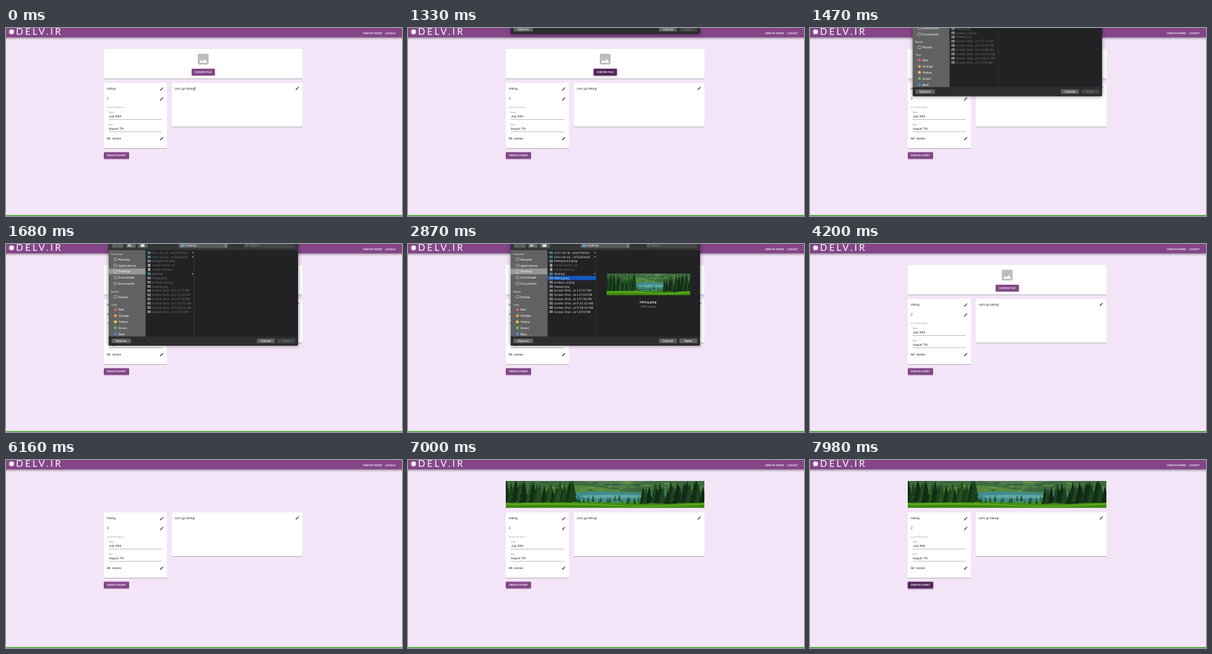
Animation of 640 by 305 pixels, one loop 8000 ms. Source, as an HTML page:

```html
<!DOCTYPE html>
<html lang="en">
<head>
<meta charset="utf-8">
<title>Event form</title>
<style>
  html, body { margin: 0; width: 100%; height: 100%; overflow: hidden; background: #f3e5f7; }
  svg { display: block; width: 100vw; height: 100vh; }
  text { font-family: Roboto, sans-serif; text-rendering: geometricPrecision; white-space: pre; }
  #dialog text { font-family: Inter, sans-serif; }
</style>
</head>
<body>
<svg id="stage" viewBox="0 0 640 305" preserveAspectRatio="none"></svg>
<script>
const LOOP = 8000, STEP = 70;
const PURPLE = [132, 70, 137], DARK = [84, 39, 92];
const EDIT = 'M3 17.25V21h3.75L17.81 9.94l-3.75-3.75L3 17.25zM20.71 7.04c.39-.39.39-1.02 0-1.41l-2.34-2.34c-.39-.39-1.02-.39-1.41 0l-1.83 1.83 3.75 3.75 1.83-1.83z';
const IMAGE = 'M21 19V5c0-1.1-.9-2-2-2H5c-1.1 0-2 .9-2 2v14c0 1.1.9 2 2 2h14c1.1 0 2-.9 2-2zM8.5 13.5l2.5 3.01L14.5 12l4.5 6H5l3.5-4.5z';

const rect = (x, y, w, h, fill, extra = '') =>
  `<rect x="${x}" y="${y}" width="${w}" height="${h}" fill="${fill}" ${extra}/>`;
const text = (x, y, str, size, fill, extra = '') =>
  `<text x="${x}" y="${y}" font-size="${size}" fill="${fill}" ${extra}>${str}</text>`;
const path = (d, fill, extra = '') => `<path d="${d}" fill="${fill}" ${extra}/>`;
const dot = (x, y, r, fill) => `<circle cx="${x}" cy="${y}" r="${r}" fill="${fill}"/>`;
const mid = 'text-anchor="middle"';

// ---- form page ----
const card = (x, y, w, h) => rect(x, y, w, h, '#fff', 'rx="1.2" filter="url(#lift)"');
const body = (x, y, str) => text(x, y, str, 4.9, '#222', 'letter-spacing=".046"');
const caps = (x, y, str, extra = '') =>
  text(x, y, str, 4.3, '#fff', `font-weight="500" letter-spacing=".123" ${extra}`);
const pencil = (x, y) =>
  path(EDIT, '#555', `transform="translate(${x} ${y}) scale(.307) translate(-12 -12)"`);
const button = (id, x, y, w, h, label) =>
  rect(x, y, w, h, '#000', `rx="1.3" id="${id}" filter="url(#lift)"`) +
  caps(x + w / 2, y + h / 2 + 1.6, label, mid);
const field = (y, label, value) =>
  text(166, y, label, 3.7, '#808080') + body(166.2, y + 7.3, value) +
  rect(166, y + 10.2, 86, .5, '#777');

const header =
  rect(0, 15, 640, 4.5, 'url(#under)') + rect(0, 0, 640, 15.2, '#844689') +
  dot(9, 6.3, 4, '#f6eef7') +
  text(16.2, 11, 'DELV.IR', 15, '#fff', 'style="font-family:Lato,sans-serif" letter-spacing="3.3"') +
  caps(577, 9.7, 'CREATE EVENT') + caps(613, 9.7, 'LOGOUT');

const upload = card(158, 34, 321, 48) +
  path(IMAGE, '#bdbdbd', 'transform="translate(318.7 50.4) scale(.97) translate(-12 -12)"') +
  button('choose', 300, 66, 37.6, 11, 'CHOOSE FILE');

const details =
  card(158, 89, 102, 106) + card(267.7, 89, 211.3, 71) +
  body(163, 100.3, 'Hiking') + body(163, 116.2, '2') +
  text(163, 129.8, 'Event Window', 4.1, '#a3a3a3', 'letter-spacing=".1"') +
  field(138, 'Start', 'July 30th') + field(157.7, 'End', 'August 7th') +
  body(163, 181, 'Mt. Harlen') + body(272.7, 100.3, "Let's go hiking!") +
  rect(305.3, 95, .6, 7.2, '#333', 'id="caret"') +
  pencil(251.7, 99) + pencil(251.7, 114.9) + pencil(251.7, 179.4) + pencil(470.9, 97.9) +
  button('create', 158, 201.5, 41, 10.7, 'CREATE EVENT');

// ---- banner picture, drawn in a 321 by 43.5 box ----
let seed = 11;
const rnd = () => (seed = (seed * 16807) % 2147483647) / 2147483647;

function pine(x, base, h, fill) {
  const w = h * .24;
  let d = '';
  for (let i = 0; i < 3; i++) {
    const top = base - h + i * h * .24, half = w * (.5 + i * .25);
    d += `M${x} ${top}L${x + half} ${top + h * .5}H${x - half}Z`;
  }
  return path(d, fill);
}
function pines(from, to, n, size, base, tones) {
  let out = '';
  for (let i = 0; i < n; i++) {
    const x = from + (to - from) * (i + rnd()) / n;
    out += pine(x, base + rnd() * 4, size * (.6 + rnd() * .5), tones[i % tones.length]);
  }
  return out;
}
function picture() {
  let out = rect(0, 0, 321, 43.5, '#4d7b4c') +
    path('M0 0H120L180 12L230 0H321V30H0Z', '#3e6d3f') +
    path('M60 12Q120 2 175 14T321 8V30H60Z', '#53873c');
  for (let i = 0; i < 36; i++) {
    out += `<ellipse cx="${60 + rnd() * 220}" cy="${2 + rnd() * 15}" rx="${3 + rnd() * 8}" ry="${.7 + rnd()}" fill="${i % 2 ? '#6c9c4b' : '#2c5835'}" opacity=".7"/>`;
  }
  return out +
    path('M95 22Q130 15 180 18T290 19V35H95Z', '#3f8c91') +
    path('M120 24Q170 20 245 25L230 28H130Z', '#60a7a8') +
    path('M0 30Q80 31 140 34T225 31T321 29V43.5H0Z', '#418c19') +
    pines(112, 225, 17, 11, 33, ['#1d4c20', '#2a6423']) +
    pines(0, 112, 23, 36, 34, ['#122e17', '#1b411c', '#254f1f']) +
    pines(220, 321, 21, 36, 34, ['#142f18', '#1d451d', '#0f2814']) +
    path('M0 36Q90 33 160 38T321 35V43.5H0Z', '#55a51a') +
    path('M0 40Q90 38 170 41T321 39V43.5H0Z', '#3b8511');
}

// ---- file dialog ----
const LIST = [
  ['2021-04-19…a630718204', 'dir'], ['2021-06-02…c175290638', 'dir'],
  ['background.jpeg', 'img'], ['create-event-1.js', 'doc'], ['create-event.js', 'doc'],
  ['desktop', 'dir'], ['hiking.jpeg', 'img'], ['product_id.png', 'img'], ['related.png', 'img'],
  ...['1.27.47', '2.27.04', '3.57.36', '11.32.53', '11.38.23', '1.57.19']
    .map((s, i) => [`Screen Shot…at ${s} ${i == 3 || i == 4 ? 'AM' : 'PM'}`, 'img'])
];
const rowY = i => 14 + i * 6.857;

const fileRow = ([name, kind], i) => {
  const y = rowY(i);
  const icon = kind == 'dir'
    ? rect(228.5, y - 2, 5.6, 4.2, '#467a94', 'rx=".6"') + path(`M301 ${y - 1.5}l2 1.5l-2 1.5z`, '#aaa')
    : kind == 'doc' ? rect(229.4, y - 2.5, 3.9, 5, '#a5a5a5')
    : rect(228.5, y - 2, 5.5, 4, '#909499') + rect(229.2, y - .5, 4.1, 1.6, '#5b6670');
  return icon + text(236, y + 1.7, name, 4.7, '#737376', `class="${kind == 'doc' ? 'off' : 'file'}"`);
};

const side = (y, label, icon) => icon + text(181.7, y + 1.8, label, 4.8, '#f3f3f3', 'font-weight="500"');
const group = (y, label) => text(170, y + 1.5, label, 4.2, '#cfcfcf', 'font-weight="500"');
const glyph = y => rect(174.5, y - 2, 5, 4, 'none', 'rx=".8" stroke="#e6e6e6" stroke-width=".6"');
const tags = [['Red', '#f1605a'], ['Orange', '#f3a33b'], ['Yellow', '#f4d23f'], ['Green', '#62c655'], ['Blue', '#3c8df0']];

const sidebar = rect(166, 10, 59.5, 140, '#626163') + rect(166, 39.8, 59.5, 9.4, '#979698') +
  group(16.5, 'Favorites') +
  ['Recents', 'Applications', 'Desktop', 'Downloads', 'Documents']
    .map((s, i) => side(24.9 + i * 9.85, s, glyph(24.9 + i * 9.85))).join('') +
  group(77, 'Media') + side(85.7, 'Photos', glyph(85.7)) + group(98, 'Tags') +
  tags.map(([s, c], i) => side(106.5 + i * 9.85, s, dot(176.8, 106.5 + i * 9.85, 2.3, c))).join('');

const pill = (x, w, y, h, fill) => rect(x, y, w, h, fill, 'rx="1.3"');
const toolbar = rect(166, -12, 306, 22, '#353436') +
  [[171, 19], [194, 16], [213, 16], [279, 79.5]].map(([x, w]) => pill(x, w, -2, 8.6, '#5b5a5c')).join('') +
  path('M177 .5l-2 2l2 2M184 .5l2 2l-2 2', 'none', 'stroke="#8b8b8b" stroke-width=".7"') +
  [0, 2, 4].map(i => rect(197 + i, .5, 1.3, 4, '#ddd')).join('') +
  path('M204.5 2l1.2 1.4l1.2-1.4', 'none', 'stroke="#ddd" stroke-width=".6"') +
  rect(217.5, .6, 6.5, 4.2, '#e4e4e4', 'rx=".6"') +
  rect(282, .4, 5.4, 4.3, '#5fa6cf', 'rx=".6"') +
  text(289, 4.3, 'Desktop', 4.8, '#eee', 'font-weight="500"') +
  path('M353.8 1.8l1.3-1.6l1.3 1.6M353.8 3.5l1.3 1.6l1.3-1.6', 'none', 'stroke="#eee" stroke-width=".7"') +
  pill(384.5, 83, -2, 8.6, '#454446') +
  `<circle cx="389" cy="2" r="1.5" fill="none" stroke="#aaa" stroke-width=".5"/>` +
  text(393, 4.3, 'Search', 4.8, '#929294');

const footer = path('M166 150H472V163.5Q472 165 470.5 165H167.5Q166 165 166 163.5Z', '#2d2c2e') +
  pill(170.5, 31.5, 153.6, 7.2, '#626163') + pill(405.5, 29, 153.6, 7.2, '#626163') +
  rect(438.5, 153.6, 29, 7.2, '#464547', 'rx="1.3" id="openBox"') +
  [[186, 'Options'], [420, 'Cancel']].map(([x, s]) => text(x, 159, s, 5, '#f4f4f4', `${mid} font-weight="500"`)).join('') +
  text(453, 159, 'Open', 5, '#777', `${mid} font-weight="500" id="openText"`);

const preview = `<g id="preview"><use href="#scene" transform="translate(321 48) scale(.42 .8)"/>` +
  text(388, 96, 'hiking.jpeg', 5, '#eee', `${mid} font-weight="600"`) +
  text(388, 103, 'JPEG image', 4.3, '#999', mid) + '</g>';

const dialog = rect(166, -12, 306, 177, '#000', 'opacity=".5" filter="url(#soft)"') +
  sidebar + rect(225.5, 10, 246.5, 140, '#222224') +
  rect(225.5, rowY(6) - 3.4, 78.5, 6.8, '#1558c0', 'id="pick"') +
  LIST.map(fileRow).join('') + rect(304, 10, .6, 140, '#3b3b3d') + preview + toolbar + footer;

const stop = (at, color, alpha = 1) => `<stop offset="${at}" stop-color="${color}" stop-opacity="${alpha}"/>`;
const blur = (id, dev) => `<filter id="${id}" x="-20%" y="-20%" width="140%" height="140%"><feGaussianBlur stdDeviation="${dev}"/></filter>`;
const defs = `<defs>
  <filter id="lift" x="-10%" y="-20%" width="120%" height="150%"><feDropShadow dx="0" dy=".55" stdDeviation=".45" flood-opacity=".45"/></filter>
  <filter id="raise" x="-20%" y="-30%" width="140%" height="190%"><feDropShadow dx="0" dy="1" stdDeviation="1" flood-opacity=".5"/></filter>
  ${blur('soft', 3)}
  <linearGradient id="under" x2="0" y2="1">${stop(0, '#000', .32)}${stop(1, '#000', 0)}</linearGradient>
  <linearGradient id="frost" gradientUnits="userSpaceOnUse" x1="0" x2="0" y1="0" y2="60">
    ${stop(0, '#694a70')}${stop(.25, '#75617a')}${stop(.55, '#817d82')}${stop(1, '#848484')}</linearGradient>
  <radialGradient id="glow" gradientUnits="userSpaceOnUse" cx="318" cy="71" r="32">
    ${stop(0, '#75606f')}${stop(.4, '#75606f', .7)}${stop(1, '#75606f', 0)}</radialGradient>
  <clipPath id="frame">${rect(0, 0, 321, 43.5, '#000')}</clipPath>
  <g id="scene" clip-path="url(#frame)">${picture()}</g>
</defs>`;

document.getElementById('stage').innerHTML = defs +
  rect(0, 0, 640, 305, '#f3e5f7') + rect(0, 303.6, 640, 1.4, '#339a1c') + header +
  `<g id="upload">${upload}</g><use id="banner" href="#scene" x="158" y="34"/>` +
  `<g id="details">${details}</g><g id="dialog">${dialog}</g>` +
  `<g id="blank">${rect(166, 10, 306, 140, 'url(#frost)')}${rect(166, 10, 306, 140, 'url(#glow)')}</g>`;

// ---- motion ----
const $ = id => document.getElementById(id);
const set = (el, name, value) => el.setAttribute(name, value);
const show = (id, on) => set($(id), 'display', on ? 'inline' : 'none');
const clamp = v => Math.max(0, Math.min(1, v));
const ease = v => { v = clamp(v); return v * v * (3 - 2 * v); };
const files = [...document.querySelectorAll('.file')];
const blanks = [...$('blank').children];

function hover(id, amount) {
  const mix = PURPLE.map((c, i) => Math.round(c + (DARK[i] - c) * amount));
  set($(id), 'fill', `rgb(${mix})`);
  set($(id), 'filter', amount > .4 ? 'url(#raise)' : 'url(#lift)');
}

function draw(t) {
  show('caret', t < 420);
  hover('choose', t < 2500 ? ease((t - 700) / 250) : 0);
  hover('create', ease((t - 7140) / 250));

  const sent = t >= 6160;
  show('upload', !sent);
  show('banner', t >= 6930);
  set($('details'), 'transform', `translate(0 ${sent ? -4 : 0})`);

  const down = ease((t - 1285) / 300) - ease((t - 3822) / 330);
  const shift = 165 * (down - 1);
  const open = t > 1285 && t < 4152, closing = open && t >= 3780;
  show('dialog', open);
  set($('dialog'), 'transform', `translate(0 ${shift})`);
  show('blank', closing);
  blanks.forEach(b => set(b, 'y', 10 + shift));

  const picked = t >= 2170;
  files.forEach((f, i) => set(f, 'fill', t >= 1750 ? '#e6e6e8' : '#737376'));
  show('pick', picked);
  show('preview', t >= 2310);
  set($('openBox'), 'fill', picked ? '#626163' : '#464547');
  set($('openText'), 'fill', picked ? '#f4f4f4' : '#777');
}

const start = performance.now();
function tick() {
  const t = (performance.now() - start) % LOOP;
  draw(Math.floor(t / STEP) * STEP);
  requestAnimationFrame(tick);
}
tick();
</script>
</body>
</html>
```
